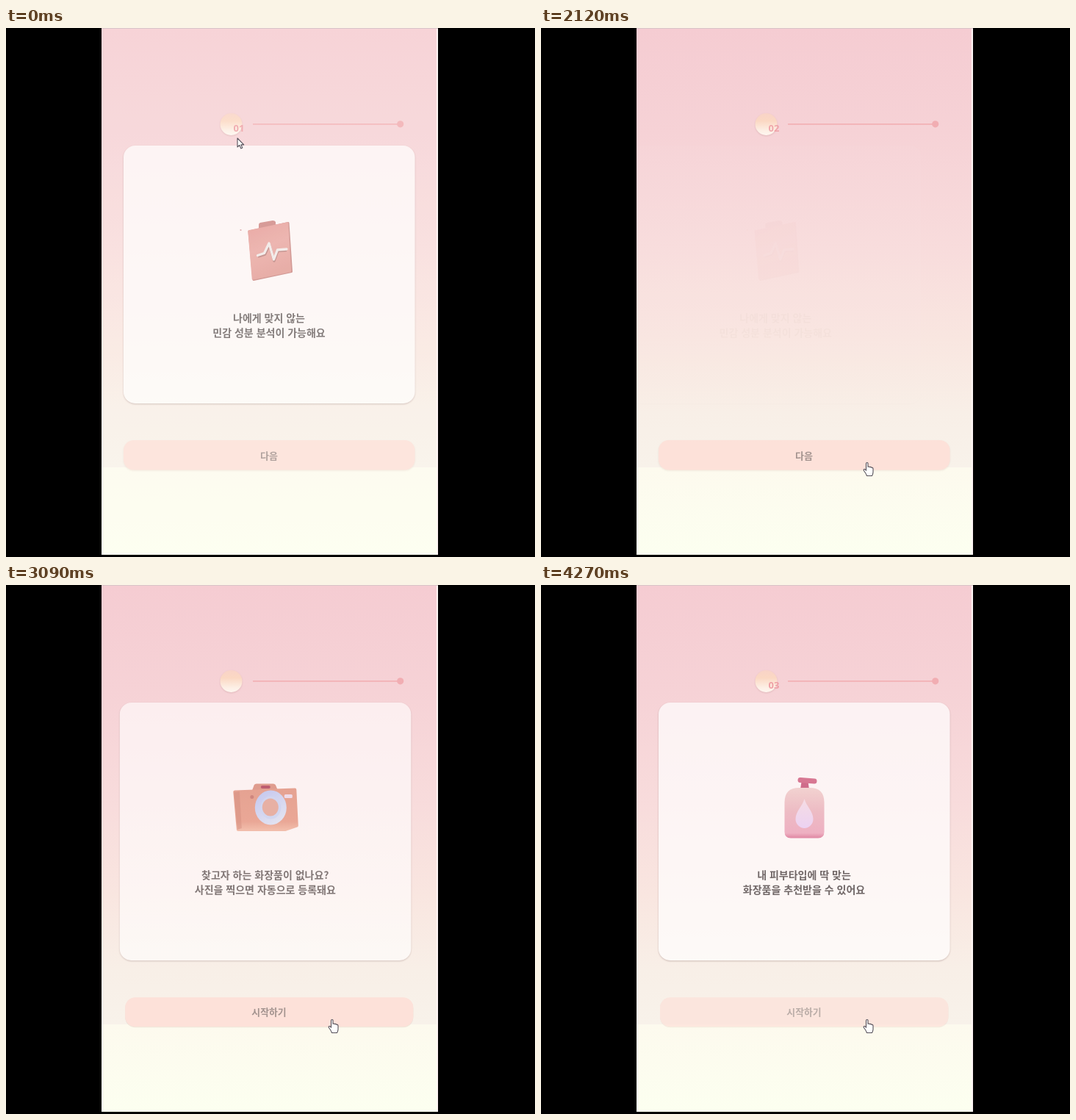
Animation of 720x720 px, one loop 4.33 s. Source, as an HTML page:

```html
<!DOCTYPE html>
<html lang="ko">
<head>
<meta charset="utf-8">
<style>
  html, body { margin: 0; width: 100%; height: 100%; overflow: hidden; background: #000; }
  svg { display: block; width: 100vw; height: 100vh; }
  text { font: 700 14px "Noto Sans CJK KR", "Noto Sans CJK", "Noto Sans", sans-serif; text-anchor: middle; fill: #706767; }
  .label { font-size: 13px; fill: #a3938f; }
  #number { font: 600 13px "Noto Sans", "Open Sans", sans-serif; fill: #ef9fa5; }
</style>
</head>
<body>
<svg viewBox="0 0 720 720">
  <defs>
    <linearGradient id="sky" x2="0" y2="1">
      <stop offset="0" stop-color="#f5ccd2"/>
      <stop offset=".2" stop-color="#f6d2d6"/>
      <stop offset=".42" stop-color="#f8dcdc"/>
      <stop offset=".59" stop-color="#f9e6e0"/>
      <stop offset=".73" stop-color="#f8efe7"/>
      <stop offset=".834" stop-color="#f8f2ea"/>
      <stop offset=".834" stop-color="#fdfaee"/>
      <stop offset="1" stop-color="#fcfff0"/>
    </linearGradient>
    <linearGradient id="ball" x2="0" y2="1">
      <stop offset="0" stop-color="#f9d3c8"/>
      <stop offset=".35" stop-color="#fbd8c3"/>
      <stop offset=".8" stop-color="#fdf0e6"/>
      <stop offset="1" stop-color="#fff6f0"/>
    </linearGradient>
    <linearGradient id="board" x2=".3" y2="1">
      <stop offset="0" stop-color="#e59c98"/>
      <stop offset=".5" stop-color="#eaaaa5"/>
      <stop offset="1" stop-color="#e3a09a"/>
    </linearGradient>
    <linearGradient id="camera" x2="0" y2="1">
      <stop offset="0" stop-color="#e39a88"/>
      <stop offset=".8" stop-color="#e8a08c"/>
      <stop offset="1" stop-color="#f1b8a4"/>
    </linearGradient>
    <linearGradient id="lens" x2=".6" y2="1">
      <stop offset="0" stop-color="#bcc4f2"/>
      <stop offset="1" stop-color="#dfe3f4"/>
    </linearGradient>
    <linearGradient id="bottle" x2="0" y2="1">
      <stop offset="0" stop-color="#f2d2d0"/>
      <stop offset=".45" stop-color="#edbcc4"/>
      <stop offset=".9" stop-color="#eeb0c2"/>
      <stop offset="1" stop-color="#df86a2"/>
    </linearGradient>
    <linearGradient id="drop" x2="0" y2="1">
      <stop offset="0" stop-color="#f5dce4"/>
      <stop offset="1" stop-color="#ecd2f2"/>
    </linearGradient>
    <filter id="shadow" x="-5%" y="-5%" width="110%" height="115%">
      <feGaussianBlur stdDeviation=".8"/>
    </filter>
    <mask id="outsideCard">
      <path fill="#fff" d="M0 0H720V720H0Z"/>
      <rect x="160" y="160" width="396.5" height="351" rx="16" fill="#000"/>
    </mask>
    <clipPath id="screen"><path d="M130 0H588V717H130Z"/></clipPath>
    <g id="card">
      <g mask="url(#outsideCard)">
        <rect x="160" y="161" width="396.5" height="351" rx="16" fill="#806060" opacity=".35" filter="url(#shadow)"/>
      </g>
      <rect x="160" y="160" width="396.5" height="351" rx="16" fill="#fff" opacity=".7"/>
    </g>
  </defs>

  <path d="M0 0H720V720H0Z"/>
  <g clip-path="url(#screen)">
    <path d="M130 0H588V717H130Z" fill="url(#sky)"/>

    <circle cx="306.5" cy="132" r="15" fill="#b08080" opacity=".3" filter="url(#shadow)"/>
    <circle cx="306.5" cy="131" r="15" fill="url(#ball)"/>
    <path d="M336 130.8H537" stroke="#f2b1b5" stroke-width="1.7"/>
    <circle cx="536.7" cy="130.8" r="4.6" fill="#f1adb2"/>
    <text id="number" x="317" y="140.5">01</text>

    <g class="slide">
      <use href="#card"/>
      <g stroke-linejoin="round">
        <path d="M344 273V267.500Q344 265.500 346 265L363 262Q366 262 367 264V270Z" fill="#d08b88"/>
        <path d="M331 277L384 265.500L388.500 331.500L337 342.500Z" fill="#cb8a86" stroke="#cb8a86" stroke-width="3"/>
        <path d="M330.500 276.500L383 265.500L387 331L336 341.500Z" fill="url(#board)" stroke="url(#board)" stroke-width="2.500"/>
        <path d="M343 311L352.500 308L358.500 295L365 317L370 303.500L382 302.500" fill="none" stroke="#bd8582" stroke-width="3.500"/>
        <path d="M342.500 309.500L351.500 306.500L358 293L364.500 315L369.500 302L382 301" fill="none" stroke="#f1e9e7" stroke-width="3.300" stroke-linecap="round"/>
      </g>
      <circle cx="319.500" cy="275" r="1.100" fill="#d9a0a4"/>
      <g class="copy">
        <text x="358" y="400">나에게 맞지 않는</text>
        <text x="358" y="420">민감 성분 분석이 가능해요</text>
      </g>
    </g>

    <g class="slide">
      <use href="#card"/>
      <path d="M340 280L343 272Q344 270.500 346 270.500H369Q371 270.500 372 272L375 279Z" fill="#dc9383"/>
      <rect x="352" y="273" width="13" height="4" rx="2" fill="#b54b61"/>
      <g stroke-linejoin="round">
        <path d="M316.500 281.500L398.500 278.500L401 327.500L385 333L321 333Z" fill="url(#camera)" stroke="url(#camera)" stroke-width="4"/>
        <path d="M315.500 282L320 333L326 331L323 281Z" fill="#cf8373" opacity=".5"/>
      </g>
      <circle cx="340" cy="288.500" r="2.500" fill="#c97a72"/>
      <rect x="384" y="285" width="11" height="5" rx="1.500" fill="#eedcec"/>
      <ellipse cx="365.500" cy="303" rx="21.500" ry="23.500" fill="url(#lens)"/>
      <ellipse cx="365.500" cy="303" rx="14" ry="15.500" fill="#cdd5f3"/>
      <ellipse cx="365" cy="302.500" rx="11" ry="12" fill="#e5aa9c"/>
      <g class="copy">
        <text x="358" y="400">찾고자 하는 화장품이 없나요?</text>
        <text x="358" y="420">사진을 찍으면 자동으로 등록돼요</text>
      </g>
    </g>

    <g class="slide">
      <use href="#card"/>
      <path d="M354.500 268H363.500L365 278H353Z" fill="#cf6c8a"/>
      <path d="M353 265.500L372 267" stroke="#d77792" stroke-width="7" stroke-linecap="round"/>
      <path d="M331.500 296Q331.500 276 351 276H366Q385.500 276 385.500 296V336Q385.500 344.500 377 344.500H340Q331.500 344.500 331.500 336Z" fill="url(#bottle)"/>
      <path d="M358.500 291C361 301 370.500 308 370.500 318.500A12 12.500 0 0 1 346.500 318.500C346.500 308 356 301 358.500 291Z" fill="url(#drop)"/>
      <g class="copy">
        <text x="358" y="400">내 피부타입에 딱 맞는</text>
        <text x="358" y="420">화장품을 추천받을 수 있어요</text>
      </g>
    </g>

    <g id="button">
      <rect x="160" y="562" width="396.500" height="40.500" rx="14" fill="#a07060" opacity=".14" filter="url(#shadow)"/>
      <rect x="160" y="561" width="396.500" height="40.500" rx="14" fill="#fde1d9"/>
      <text id="label" class="label" x="358" y="586.500">다음</text>
    </g>

    <path id="veil" d="M130 0H588V717H130Z" fill="#fffaf5"/>
    <path d="M586 0H588V717H586Z" fill="#fff6f5"/>
    <path d="M130 0H588V1H130Z" fill="#d8c6c9"/>
    <g id="cursor" fill="#fff" stroke="#55505a" stroke-width="1.100" stroke-linejoin="round">
      <path id="arrow" d="M0 0V12L2.800 9.500L4.800 14L6.800 13.100L4.900 8.900H8.700Z"/>
      <path id="hand" d="M-2.500 -7.500Q-2.500 -9 -1.200 -9T0 -7.500V-3.200Q1.200 -4 2.300 -2.900Q3.600 -3.500 4.600 -2.300Q6.800 -2.700 7 -.5V4Q7 6 5.500 9H-1.500Q-2.500 6 -5.200 2.500Q-6.500 .5 -5 0Q-3.700 -.3 -2.500 1.800Z"/>
    </g>
  </g>
</svg>
<script>
const LOOP = 4330, SHIFT = 40;
const CLICKS = [1853, 3057];
const SLIDES = [
  { enter: -1000, exit: CLICKS[0], exitTime: 320 },
  { enter: 2186, exit: CLICKS[1], exitTime: 410 },
  { enter: 3486, exit: Infinity, exitTime: 1 },
];
const PRESS = [[1610, 1], [1760, .98], [1870, .982], [2050, 1], [3070, 1], [3090, .989], [3250, 1], [4180, 1], [4270, .99], [4330, .985]];
const POINTER_X = [[1029, 315], [1030, 372], [1089, 420], [1090, 447], [1269, 447], [1270, 445]];
const POINTER_Y = [[1029, 150], [1030, 330], [1089, 500], [1090, 598], [1269, 598], [1270, 600.5]];

const $ = id => document.getElementById(id);
const slides = [...document.querySelectorAll('.slide')];
const clamp = v => Math.max(0, Math.min(1, v));
const easeOut = (t, start, duration) => Math.sin(clamp((t - start) / duration) * Math.PI / 2);

function track(keys, t) {
  const next = keys.findIndex(([time]) => time > t);
  if (next < 0) return keys.at(-1)[1];
  if (next === 0) return keys[0][1];
  const [t0, a] = keys[next - 1], [t1, b] = keys[next];
  return a + (b - a) * (t - t0) / (t1 - t0);
}

function drawSlide(el, { enter, exit, exitTime }, t) {
  const shown = easeOut(t, enter, 400), gone = easeOut(t, exit, exitTime);
  const copy = el.querySelector('.copy'), copyIn = easeOut(t, enter + 190, 300);
  el.setAttribute('transform', `translate(${SHIFT * (1 - shown - gone)})`);
  el.setAttribute('opacity', shown * (1 - gone));
  copy.setAttribute('transform', `translate(0 ${10 * (1 - copyIn)})`);
  copy.setAttribute('opacity', copyIn);
}

function draw(t) {
  slides.forEach((el, i) => drawSlide(el, SLIDES[i], t));

  const step = CLICKS.filter(click => t >= click).length;
  $('number').textContent = '0' + (step + 1);
  $('number').setAttribute('opacity', step ? easeOut(t, CLICKS[step - 1] + 35, 330) : 1);
  $('label').textContent = step === 2 ? '시작하기' : '다음';

  const scale = track(PRESS, t);
  $('button').setAttribute('transform', `translate(358.2 581.5) scale(${scale}) translate(-358.2 -581.5)`);
  $('button').setAttribute('opacity', 1 - .28 * clamp((t - 4180) / 90));

  const y = track(POINTER_Y, t), onButton = y > 561;
  $('cursor').setAttribute('transform', `translate(${track(POINTER_X, t)} ${y})`);
  $('arrow').setAttribute('visibility', onButton ? 'hidden' : 'visible');
  $('hand').setAttribute('visibility', onButton ? 'visible' : 'hidden');

  $('veil').setAttribute('opacity', .14 * (1 - clamp(t / 210)));
}

const start = performance.now();
function tick() {
  draw((performance.now() - start) % LOOP);
  requestAnimationFrame(tick);
}
tick();
</script>
</body>
</html>
```
